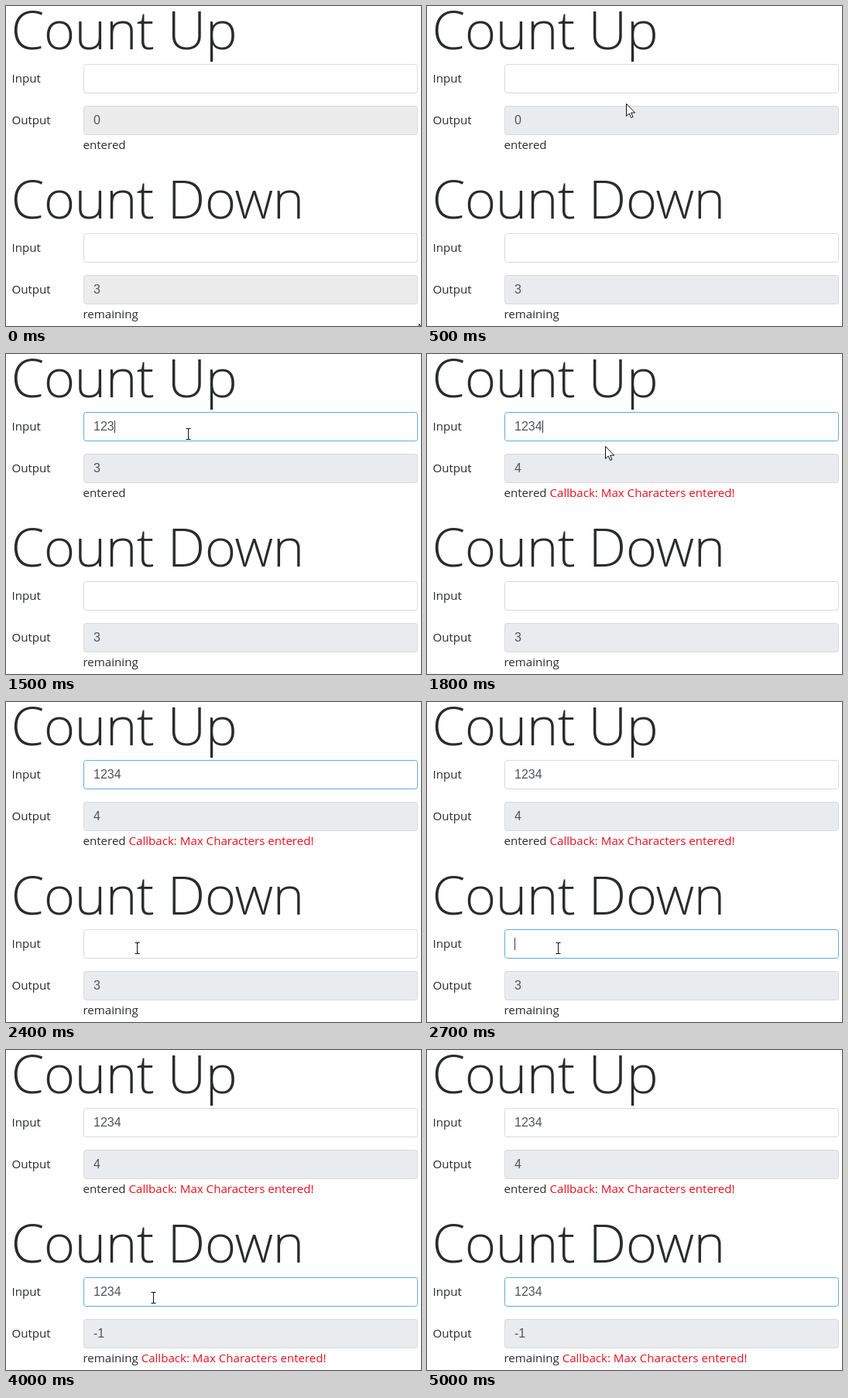
An HTML page that plays this animation: 536x414 px, repeating every 5.1 s.

```html
<!DOCTYPE html>
<html lang="en">
<head>
<meta charset="utf-8">
<title>Character counter</title>
<style>
  html, body { margin: 0; width: 100%; height: 100%; overflow: hidden; background: #fff; }
  svg { display: block; }
  text { font: 15.1px "Open Sans", "Noto Sans", sans-serif; fill: #292b2c; }
  .title { font-size: 69px; font-weight: 300; letter-spacing: -.6px; }
  .value { font: 16px "Liberation Sans", Arial, sans-serif; fill: #505356; }
  .message { fill: #ea101c; }
  .field { fill: #fff; stroke: #d9d9d9; }
  .caret { stroke: #333; }
</style>
</head>
<body>
<svg id="stage" width="536" height="414" viewBox="0 0 536 414">
  <g id="forms"></g>
  <g id="pointer">
    <path id="beam" d="M-3-7h6M0-7V7M-3 7h6" fill="none" stroke="#111"/>
    <path id="arrow" d="M0 0V16l3.7-3.5 2.4 5.6 2.4-1-2.4-5.5h5.1z" fill="#fff" stroke="#111"/>
  </g>
</svg>
<script>
const LOOP = 5100, STEP = 100, BLINK = 530, FADE = 150;
const $ = id => document.getElementById(id);
const clamp = v => Math.max(0, Math.min(1, v));

const forms = [
  { title: "Count Up", unit: "entered", y: 0, focus: 650, blur: 2450,
    keys: [1300, 1400, 1500, 1600], count: n => n },
  { title: "Count Down", unit: "remaining", y: 219, focus: 2450, blur: Infinity,
    keys: [2800, 2900, 3100, 3300], count: n => 3 - n },
];

// Pointer stops: time, x, y
const stops = [
  [0, 533, 411], [600, 235, 103], [1700, 235, 103], [2300, 169, 318],
  [3600, 169, 318], [4000, 190, 320], [4200, 190, 320], [4500, 280, 432], [LOOP, 280, 432],
];

const field = y => `<rect class="field" x="100.5" y="${y + .5}" width="431" height="37" rx="3"/>`;

for (const form of forms) {
  const group = document.createElementNS("http://www.w3.org/2000/svg", "g");
  group.setAttribute("transform", `translate(0 ${form.y})`);
  group.innerHTML = `
    <text class="title" x="6.5" y="56">${form.title}</text>
    <text x="7.5" y="99">Input</text>${field(75)}
    <text class="value" x="113" y="99"></text>
    <path class="caret" d="M.5 86v16"/>
    <text x="7.5" y="153">Output</text>${field(129)}
    <text class="value" x="113" y="153"></text>
    <text x="99.5" y="185">${form.unit} <tspan class="message">Callback: Max Characters entered!</tspan></text>`;
  $("forms").append(group);
  [form.input, form.output] = group.querySelectorAll(".value");
  [form.inputBox, form.outputBox] = group.querySelectorAll(".field");
  form.caret = group.querySelector(".caret");
  form.message = group.querySelector(".message");
}

const show = (node, visible) => node.style.visibility = visible ? "visible" : "hidden";

function drawForm(form, t) {
  const typed = form.keys.filter(key => key <= t);
  const n = typed.length;
  form.input.textContent = "1234".slice(0, n);
  form.output.textContent = form.count(n);
  show(form.message, n === 4);

  const glow = clamp((t - form.focus) / FADE) - clamp((t - form.blur) / FADE);
  const mix = (from, to) => Math.round(from + (to - from) * glow);
  form.inputBox.style.stroke = `rgb(${mix(217, 94)},${mix(217, 171)},${mix(217, 222)})`;
  form.outputBox.style.fill = t < 100 ? "#ececec" : "#eaebee";

  const lastAction = n ? typed[n - 1] : form.focus;
  const blinkOn = Math.floor((t - lastAction) / BLINK) % 2 === 0;
  show(form.caret, t >= form.focus && t < form.blur && blinkOn);
  form.caret.setAttribute("transform", `translate(${Math.round(113 + n * 8.9)})`);
}

function drawPointer(t) {
  const i = stops.findIndex(stop => stop[0] > t);
  const [t0, x0, y0] = stops[i - 1], [t1, x1, y1] = stops[i];
  const u = (t - t0) / (t1 - t0), ease = u * u * (3 - 2 * u);
  const x = Math.round(x0 + (x1 - x0) * ease), y = Math.round(y0 + (y1 - y0) * ease);
  const overField = [75, 129, 294, 348].some(top => y >= top && y < top + 38) && x < 532;
  $("pointer").setAttribute("transform", `translate(${x + .5} ${y + .5})`);
  show($("beam"), overField);
  show($("arrow"), !overField);
}

const start = performance.now();
function draw() {
  const elapsed = (performance.now() - start) % LOOP;
  const t = Math.floor(elapsed / STEP) * STEP;
  for (const form of forms) drawForm(form, t);
  drawPointer(t);
  requestAnimationFrame(draw);
}
draw();
</script>
</body>
</html>
```
